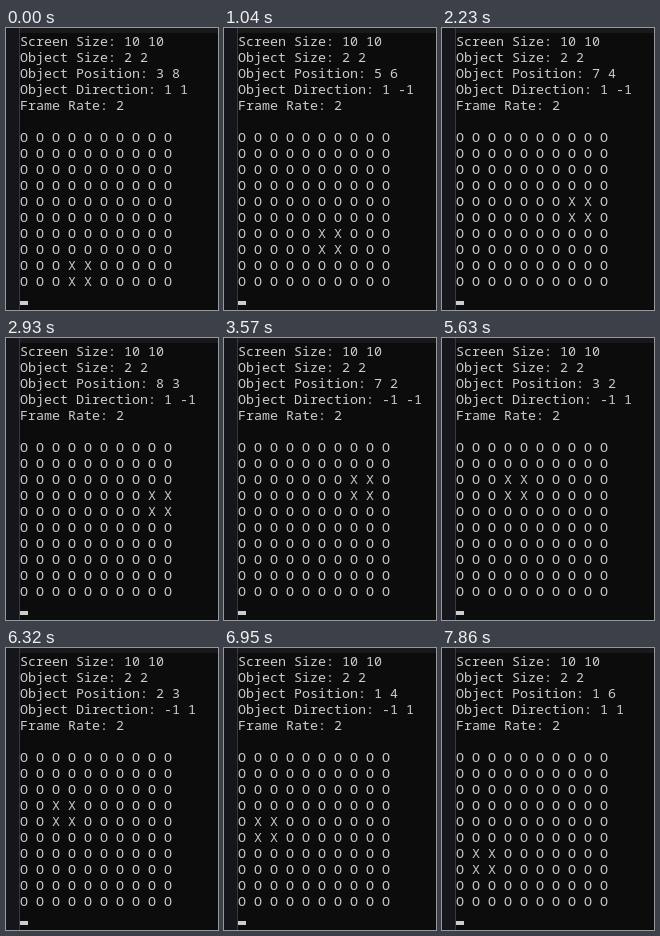
An HTML page for the animation above (8000 ms loop, 212 px wide and 282 px high).

```html
<!DOCTYPE html>
<html lang="en">
<head>
<meta charset="utf-8">
<title>Bouncing block in a console</title>
<style>
  html, body { margin: 0; width: 100%; height: 100%; overflow: hidden; background: #0c0c0c; }
  svg { display: block; width: 212px; height: 282px; }
  text { font: 13.333px "Noto Sans Mono", "DejaVu Sans Mono", monospace; fill: #ccc; }
</style>
</head>
<body>
<svg viewBox="0 0 212 282">
  <rect width="212" height="282" fill="#0c0c0c"/>
  <rect width="13" height="282" fill="#15161b"/>
  <rect x="13" width="199" height="5" fill="#19191c"/>
  <rect x="13" width="1" height="282" fill="#38383d"/>
  <g id="console"></g>
  <rect x="14" y="273" width="8" height="4" fill="#ccc"/>
</svg>
<script>
const LOOP = 8000, SIZE = 10, BLOCK = 2, MAX = SIZE - BLOCK;
const LEFT = 14, BASE = 18, LINE = 16;
const ticks = [480, 1040, 1600, 2230, 2790, 3350, 3920, 4440, 5010, 5630, 6170, 6740, 7300, 7860];

const consoleBox = document.getElementById('console');
const lines = Array.from({ length: 6 + SIZE }, (_, i) => {
  const el = document.createElementNS('http://www.w3.org/2000/svg', 'text');
  el.setAttribute('x', LEFT);
  el.setAttribute('y', BASE + LINE * i);
  return consoleBox.appendChild(el);
});

// Turn around at a wall, then move one cell.
function step(s) {
  const turn = (p, d) => (p + d < 0 || p + d > MAX ? -d : d);
  const dx = turn(s.x, s.dx), dy = turn(s.y, s.dy);
  return { x: s.x + dx, y: s.y + dy, dx, dy };
}

const states = [{ x: 3, y: 8, dx: 1, dy: 1 }];
ticks.forEach(() => states.push(step(states[states.length - 1])));

function row(s, r) {
  const inside = (v, p) => v >= p && v < p + BLOCK;
  return Array.from({ length: SIZE }, (_, c) => inside(c, s.x) && inside(r, s.y) ? 'X' : 'O').join(' ');
}

function screen(s) {
  return [
    `Screen Size: ${SIZE} ${SIZE}`,
    `Object Size: ${BLOCK} ${BLOCK}`,
    `Object Position: ${s.x} ${s.y}`,
    `Object Direction: ${s.dx} ${s.dy}`,
    'Frame Rate: 2',
    '',
    ...Array.from({ length: SIZE }, (_, r) => row(s, r))
  ];
}

let shown = -1;
function draw(t) {
  const n = ticks.filter(k => k <= t).length;
  if (n === shown) return;
  shown = n;
  screen(states[n]).forEach((str, i) => { lines[i].textContent = str; });
}

const start = performance.now();
function loop() {
  draw((performance.now() - start) % LOOP);
  requestAnimationFrame(loop);
}
loop();
</script>
</body>
</html>
```
